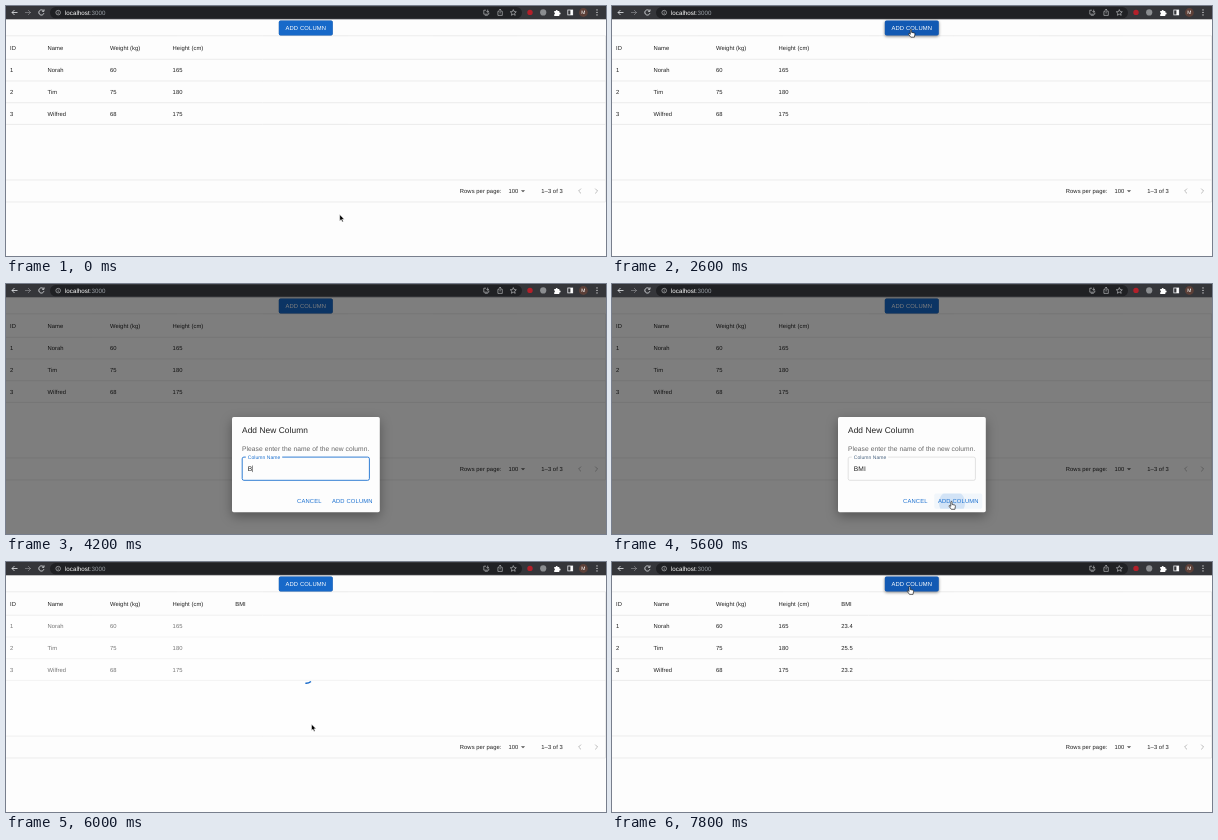
An HTML page for the animation above (8000 ms loop, 600 by 250 pixels).

```html
<!DOCTYPE html>
<html lang="en">
<head>
<meta charset="utf-8">
<title>Add column</title>
<style>
  html, body { margin: 0; width: 100%; height: 100%; overflow: hidden; background: #fdfdfd; }
  svg { display: block; width: 100%; height: 100%; }
  text { font: 5.83px "Liberation Sans", Arial, sans-serif; letter-spacing: .01em; fill: #212121; text-rendering: geometricPrecision; }
  .caps { letter-spacing: .0286em; }
  .blue { fill: #1a70d0; }
  .body { font-size: 6.67px; fill: #666; }
  .rule { stroke: #e0e0e0; stroke-width: .6; fill: none; }
  .icon { fill: none; stroke: #e8eaed; stroke-width: .8; }
  #add { filter: drop-shadow(0 .9px .7px #0005); }
  #add.hover { filter: drop-shadow(0 1.3px 1.5px #0007); }
  #panel { filter: drop-shadow(0 4px 6px #0005); }
</style>
</head>
<body>
<svg viewBox="0 0 600 250" preserveAspectRatio="none">
  <defs>
    <clipPath id="actionShape"><rect x="322.3" y="209.5" width="48" height="15.2" rx="1.7"/></clipPath>
  </defs>
  <rect width="600" height="250" fill="#fdfdfd"/>

  <g id="table"></g>
  <g id="footer">
    <text x="453.8" y="187.3">Rows per page:</text>
    <text x="502.5" y="187.3">100</text>
    <path d="M514.9 184.2h4.2l-2.1 2.1z" fill="#555"/>
    <text x="535.3" y="187.3">1–3 of 3</text>
    <path d="M575 182.6l-2.4 2.4 2.4 2.4M589.2 182.6l2.4 2.4-2.4 2.4" fill="none" stroke="#aaa" stroke-width=".8"/>
  </g>

  <g id="loading">
    <rect y="53.3" width="599" height="120.5" fill="#fff" opacity=".38"/>
    <circle id="spinner" r="7.65" fill="none" stroke="#1769c9" stroke-width="1.5"/>
  </g>

  <rect id="add" x="272.8" y="14.4" width="54" height="15.1" rx="1.7"/>
  <text class="caps" x="279.4" y="24.2" style="fill:#fff">ADD COLUMN</text>

  <rect id="backdrop" y="13" width="600" height="237"/>
  <g id="dialog">
    <rect id="panel" x="226" y="133" width="147.8" height="95.2" rx="1.7" fill="#fdfdfd"/>
    <text x="236" y="149.2" style="font-size:8.33px">Add New Column</text>
    <text class="body" x="236" y="166.8">Please enter the name of the new column.</text>
    <rect id="field" x="236.2" y="173.1" width="127.2" height="23.2" rx="1.7" fill="none"/>
    <rect id="notch" x="239.8" y="171.8" width="36.4" height="2.7" fill="#fdfdfd"/>
    <text id="label" class="body" x="241.8">Column Name</text>
    <text id="value" x="241.8" y="186.9" style="font-size:6.67px"></text>
    <path id="caret" d="M242 181.5v6.6" stroke="#222" stroke-width=".5"/>
    <g clip-path="url(#actionShape)">
      <rect id="actionHover" x="322" y="209" width="49" height="16" fill="#1a70d0" opacity=".05"/>
      <circle id="ripple" cx="340" cy="219" fill="#1a70d0"/>
    </g>
    <text class="caps blue" x="291" y="219.2">CANCEL</text>
    <text class="caps blue" x="325.9" y="219.2">ADD COLUMN</text>
  </g>

  <g id="toolbar">
    <rect width="600" height="13.3" fill="#35363a"/>
    <rect x="44" y="1" width="472" height="11.3" rx="5.6" fill="#202124"/>
    <path class="icon" d="M11.5 6.5h-5.5m2.5-2.5l-2.5 2.5 2.5 2.5"/>
    <path class="icon" d="M19 6.5h5.5m-2.5-2.5l2.5 2.5-2.5 2.5" opacity=".4"/>
    <path class="icon" d="M37.4 4.8a2.6 2.6 0 1 0 .5 2.4M38 3.4v1.9h-1.9"/>
    <g class="icon" style="stroke-width:.5">
      <circle cx="52.2" cy="6.6" r="2.3"/><path d="M52.2 6.2v1.7m0-2.8v.5"/>
      <path d="M480 4.2h-2.2v4h5v-1.7M478.8 9.3h3M481.7 3.6v2.7m-1.2-1.2l1.2 1.2 1.2-1.2"/>
      <path d="M492.9 5.4h-1v4h4.4v-4h-1M494.1 7.5v-4.3m-1.3 1.3l1.3-1.3 1.3 1.3"/>
      <path d="M507.3 3.6l.9 2 2.1.2-1.6 1.4.5 2.1-1.9-1.1-1.9 1.1.5-2.1-1.6-1.4 2.1-.2z"/>
    </g>
    <text x="58.8" y="8.8" style="font-size:6.2px;fill:#fff">localhost<tspan fill="#9aa0a6">:3000</tspan></text>
    <circle cx="524" cy="6.4" r="2.7" fill="#b3202a"/>
    <circle cx="537.2" cy="6.4" r="3.1" fill="#8b8d90"/>
    <path d="M548.2 5h1.5a1 1 0 1 1 2 0h1.6v1.6a1 1 0 1 1 0 1.9v1.4h-5.1v-1.5a1 1 0 0 0 0-1.9z" fill="#fff"/>
    <rect class="icon" x="561.8" y="4" width="4.9" height="4.9"/><path d="M564.4 4h2.4v5h-2.4z" fill="#fff"/>
    <circle cx="577.4" cy="6.5" r="4.4" fill="#5d4038"/>
    <text x="575.3" y="8.4" style="font-size:5px;fill:#fff">M</text>
    <path d="M591 3.9v.01M591 6.4v.01M591 8.9v.01" stroke="#fff" stroke-width="1.1" stroke-linecap="round"/>
  </g>

  <g id="cursor">
    <path id="arrow" d="M0 0v6.3l1.5-1.3 1 2.3 1.1-.5-1-2.2h2z" stroke="#fff" stroke-width=".5"/>
    <path id="hand" d="M-.7.9c0-1.1 1.3-1.1 1.3 0v2.3l2.5.5c.8.2.9.8.8 1.4l-.5 2.9h-3.6l-2.2-3c-.4-.8.6-1 1.1-.5l.6.6z" fill="#fff" stroke="#111" stroke-width=".65"/>
    <path id="beam" d="M-1 0q1 0 1 .8q0-.8 1-.8M0 .5v6M-1 6.5q1 0 1-.8q0 .8 1 .8" fill="none" stroke="#111" stroke-width=".6"/>
  </g>
</svg>
<script>
const LOOP = 8000, STEP = 200;
const $ = id => document.getElementById(id);
const show = (id, on) => $(id).style.display = on ? '' : 'none';
const set = (id, attrs) => {
  for (const name in attrs) $(id).setAttribute(name, attrs[name]);
};

const columns = [4, 41.5, 104, 166.6, 229.2];
const rows = [
  ['ID', 'Name', 'Weight (kg)', 'Height (cm)', 'BMI'],
  [1, 'Norah', 60, 165, '23.4'],
  [2, 'Tim', 75, 180, '25.5'],
  [3, 'Wilfred', 68, 175, '23.2'],
];
const baselines = [44, 66.3, 88, 109.6];
const rules = [29.8, 53.3, 75, 96.7, 118.4, 174, 196];
$('table').innerHTML =
  rules.map(y => `<path class="rule" d="M0 ${y}H599.6"/>`).join('') +
  '<path class="rule" d="M599.6 29.8V196"/>' +
  rows.map((row, r) => row.map((cell, c) =>
    `<text ${c == 4 ? `id="bmi${r}"` : ''} x="${columns[c]}" y="${baselines[r]}">${cell}</text>`
  ).join('')).join('');

// Pointer stops: time, x, y
const path = [
  [0, 333.7, 208.6], [200, 333.7, 208.6], [1200, 303, 101], [1800, 299.5, 24],
  [2600, 299, 23.2], [2800, 295.3, 82], [3400, 262, 181], [4600, 262, 181],
  [4800, 322, 209.5], [5200, 339.5, 217.3], [5800, 339.5, 217.3], [6000, 305.5, 162.2],
  [6800, 299, 26], [7400, 298, 24.5], [8000, 297.5, 24.3],
];

function pointerAt(t) {
  const i = path.findIndex(stop => stop[0] > t);
  const [t0, x0, y0] = path[i - 1], [t1, x1, y1] = path[i];
  const k = (t - t0) / (t1 - t0);
  return [x0 + (x1 - x0) * k, y0 + (y1 - y0) * k];
}

const ease = u => u * u * (3 - 2 * u);

function drawSpinner(elapsed) {
  const turn = elapsed / 1400 % 1;
  const grow = ease(Math.min(1, turn * 2));
  const shrink = ease(Math.max(0, turn * 2 - 1));
  set('spinner', {
    pathLength: 127,
    'stroke-dasharray': `${1 + 99 * grow} 200`,
    'stroke-dashoffset': -15 * grow - 110 * shrink,
    transform: `translate(300 113.7) rotate(${turn * 360})`,
  });
}

function drawDialog(t) {
  const closing = t === 5800;
  const open = t >= 2800 && t <= 5800;
  show('backdrop', open);
  show('dialog', open);
  if (!open) return;

  const focused = t >= 3800 && t < 5600;
  const floating = t >= 3800;
  set('backdrop', { opacity: closing ? .12 : .5 });
  set('dialog', { opacity: closing ? .25 : 1 });
  set('field', { stroke: focused ? '#1a70d0' : '#c4c4c4', 'stroke-width': focused ? .9 : .5 });
  show('notch', floating);
  $('label').setAttribute('y', floating ? 174.8 : 186.8);
  $('label').style.fontSize = floating ? '5px' : '';
  $('label').style.fill = focused ? '#1a70d0' : floating ? '#4a6480' : '';

  const typed = 'BMI'.slice(0, Math.max(0, (t - 4000) / STEP));
  $('value').textContent = typed;
  show('caret', focused && t % 1000 < 600);
  set('caret', { transform: `translate(${[0, 4.5, 10.1, 12][typed.length]} 0)` });
  show('actionHover', t >= 5000);
  show('ripple', t >= 5600);
  set('ripple', { r: closing ? 40 : 13, opacity: closing ? .8 : .14 });
}

function draw(t) {
  const [x, y] = pointerAt(t);
  const overAdd = x > 273 && x < 327 && y > 14 && y < 30;
  const overAction = t >= 5000 && t <= 5800;
  const overField = t >= 3400 && t <= 4600;
  set('cursor', { transform: `translate(${x} ${y})` });
  show('hand', overAdd || overAction);
  show('beam', overField && t < 4200);
  show('arrow', !overAdd && !overAction && !overField);

  set('add', { fill: overAdd ? '#1259b3' : '#1769c9', class: overAdd ? 'hover' : '' });

  const loading = t >= 6000 && t < 6800;
  show('loading', loading);
  if (loading) drawSpinner(t - 5830);
  rows.forEach((_, r) => show('bmi' + r, t >= (r ? 6800 : 6000)));

  drawDialog(t);
}

const start = performance.now();
function tick() {
  const t = (performance.now() - start) % LOOP;
  draw(Math.floor(t / STEP) * STEP);
  requestAnimationFrame(tick);
}
tick();
</script>
</body>
</html>
```
